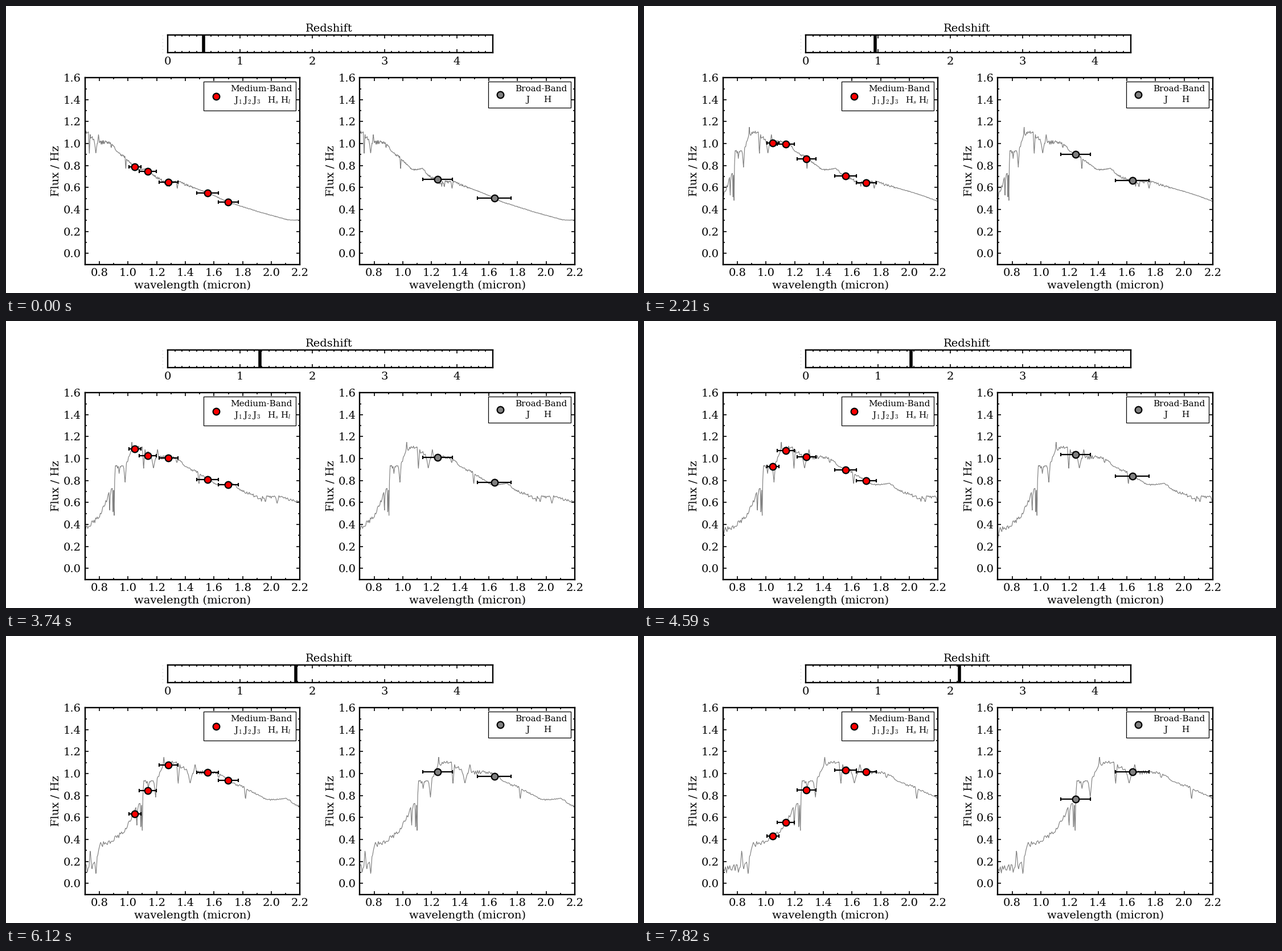
A matplotlib script that plays this animation: 1110x505 px, repeating every 7990 ms.

```python
import numpy as np
import matplotlib.pyplot as plt
from matplotlib.animation import FuncAnimation
from matplotlib.ticker import MultipleLocator

W, H, DPI = 1110, 505, 100
FRAMES, INTERVAL = 47, 170
Z_START, Z_STEP = 0.5, 3.5 / 99

plt.rcParams.update({
    "font.family": "DejaVu Serif",
    "mathtext.fontset": "cm",
    "font.size": 14,
    "axes.linewidth": 1.7,
})

# Smooth rest-frame continuum: key points (wavelength in micron, flux)
CONTINUUM = [
    (.215, .12), (.262, .13), (.278, .20), (.290, .34), (.317, .38),
    (.354, .48), (.380, .67), (.3972, .76), (.4005, .93), (.430, .93),
    (.452, 1.09), (.480, 1.11), (.510, 1.02), (.590, 1.0), (.620, .915),
    (.650, .88), (.710, .76), (.760, .77), (.785, .71), (.845, .64),
    (.900, .65), (1.04, .55), (1.13, .468), (1.28, .375), (1.41, .305),
    (1.48, .303),
]
# Spectral features: (centre, depth, half width); negative depth is a peak
FEATURES = [
    (.2657, -.12, .003), (.2800, .18, .003), (.3828, .16, .002),
    (.3930, .28, .0016), (.3964, .30, .0016), (.4118, .06, .003),
    (.4302, .13, .004), (.4508, -.06, .0016), (.4868, .20, .004),
    (.5170, .11, .007), (.5296, -.05, .003), (.5892, .05, .003),
    (.6563, .11, .003), (.8477, .04, .003), (.8604, .05, .003),
    (.8960, .05, .004),
]

# Filters: (centre, half width) in micron
MEDIUM = [(1.0475, .0415), (1.137, .06), (1.282, .0655),
          (1.556, .0755), (1.699, .07)]
BROAD = [(1.242, .103), (1.639, .118)]


def build_spectrum():
    """Continuum plus triangular features plus seeded fine texture."""
    wave = np.arange(.215, 1.48, .0008)
    flux = np.interp(wave, *np.transpose(CONTINUUM))
    for centre, depth, width in FEATURES:
        flux -= depth * np.clip(1 - abs(wave - centre) / width, 0, 1)
    grid = np.arange(.215, 1.48, .0024)
    amp = np.interp(grid, [.27, .32, .56, .62, .75, .87, 1.0],
                    [.045, .022, .020, .010, .006, .020, .003])
    noise = amp * np.random.default_rng(4).uniform(-1, 1, grid.size)
    return wave, flux + np.interp(wave, grid, noise)


WAVE, FLUX = build_spectrum()

fig = plt.figure(figsize=(W / DPI, H / DPI), dpi=DPI, facecolor="white")


def pixel_axes(left, top, right, bottom):
    ax = fig.add_axes([left / W, 1 - bottom / H,
                       (right - left) / W, (bottom - top) / H])
    ax.tick_params(which="both", direction="in", top=True, right=True,
                   width=1.2, pad=5)
    ax.tick_params(which="major", length=4.2)
    ax.tick_params(which="minor", length=2.4)
    return ax


def label(x, y, text, size=14, ha="center", va="baseline", **kw):
    fig.text(x / W, 1 - y / H, text, fontsize=size, ha=ha, va=va, **kw)


def dot_style(color):
    return dict(ls="none", marker="o", ms=8.4, mfc=color, mec="black", mew=1.6)


def legend_box(left, top, right, bottom, dot, color):
    fig.add_artist(plt.Rectangle((left / W, 1 - bottom / H), (right - left) / W,
                                 (bottom - top) / H, fc="white", ec="black",
                                 lw=0.9, zorder=3))
    fig.add_artist(plt.Line2D([dot[0] / W], [1 - dot[1] / H], zorder=4,
                              **dot_style(color)))


class Panel:
    def __init__(self, left, right, bands, color):
        self.bands = bands
        ax = pixel_axes(left, 126.25, right, 454.5)
        ax.set(xlim=(0.7, 2.2), ylim=(-0.1, 1.6))
        for axis in (ax.xaxis, ax.yaxis):
            axis.set_major_locator(MultipleLocator(0.2))
            axis.set_minor_locator(MultipleLocator(0.1))
            axis.set_major_formatter("{x:.1f}")
        label((left + right) / 2, 497, "wavelength (micron)")
        label(left - 51, 290.4, "Flux / Hz", va="center", rotation=90)
        self.curve, = ax.plot([], [], color="0.5", lw=0.85)
        self.bars = [ax.plot([], [], color="black", lw=1.6, marker="|", ms=5,
                             mew=1.6, solid_capstyle="butt", zorder=3)[0]
                     for _ in bands]
        self.dots, = ax.plot([], [], zorder=4, **dot_style(color))

    def update(self, z):
        wave = WAVE * (1 + z)
        self.curve.set_data(wave, FLUX)
        means = []
        for bar, (centre, half) in zip(self.bars, self.bands):
            ends = [centre - half, centre + half]
            mean = np.interp(np.linspace(*ends, 400), wave, FLUX).mean()
            bar.set_data(ends, [mean, mean])
            means.append(mean)
        self.dots.set_data([centre for centre, _ in self.bands], means)


# Redshift gauge
gauge = pixel_axes(284, 50.5, 855, 82)
gauge.set(xlim=(0, 4.5), ylim=(0, 1))
gauge.xaxis.set_major_locator(MultipleLocator(1))
gauge.xaxis.set_minor_locator(MultipleLocator(0.1))
gauge.xaxis.set_major_formatter("{x:.0f}")
gauge.tick_params(axis="y", left=False, right=False, labelleft=False)
needle = gauge.axvline(0, color="black", lw=4)
label(567.5, 45, "Redshift")
fig.add_artist(plt.Line2D([274.5 / W] * 6, 1 - np.linspace(52, 82, 6) / H,
                          ls="none", marker="s", ms=0.7, mew=0, color="0.7"))

panels = [Panel(138.75, 516.4, MEDIUM, "red"), Panel(621.4, 999, BROAD, "0.5")]

legend_box(347, 133, 509, 184, (368.5, 158.5), "red")
label(448.5, 150, "Medium-Band", 11)
for x, name in [(399.5, "J$_1$"), (416, "J$_2$"), (432.5, "J$_3$"),
                (459, "H$_s$"), (481.5, "H$_l$")]:
    label(x, 170, name, 11, ha="left")

legend_box(847, 133, 992, 179, (868, 156), "0.5")
label(939.5, 150, "Broad-Band", 11)
label(916.5, 169, "J", 11)
label(951, 169, "H", 11)


def draw(i):
    z = Z_START + Z_STEP * i
    needle.set_xdata([z, z])
    for panel in panels:
        panel.update(z)


anim = FuncAnimation(fig, draw, frames=FRAMES, interval=INTERVAL,
                     init_func=lambda: draw(0), repeat=True, repeat_delay=0)
plt.show()
```
